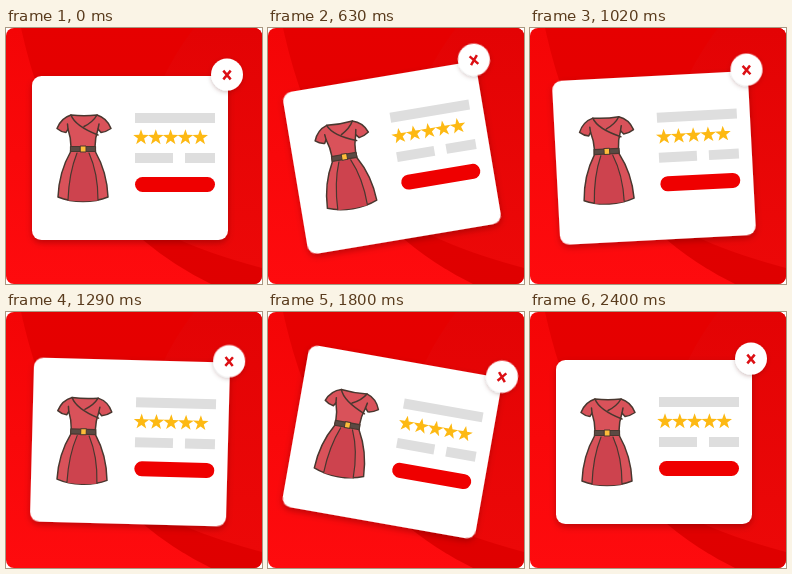
Recreate the animation shown at these times as an HTML page. Size 256x256 px, loop 2.43 s.

```html
<!DOCTYPE html>
<html lang="en">
<head>
<meta charset="utf-8">
<title>Swinging product card</title>
<style>
html, body { margin: 0; width: 100%; height: 100%; overflow: hidden; background: #fff; }
svg { display: block; width: 100vw; height: 100vh; }
</style>
</head>
<body>
<svg viewBox="0 0 256 256">
  <defs>
    <clipPath id="stage"><rect width="256" height="256" rx="8"/></clipPath>
    <linearGradient id="base" x1="0" y1="0" x2="0" y2="1">
      <stop offset="0" stop-color="#f40506"/>
      <stop offset="1" stop-color="#fe0b0e"/>
    </linearGradient>
    <linearGradient id="band" x1="0" y1="0" x2="0" y2="1">
      <stop offset="0" stop-color="#e60000"/>
      <stop offset="1" stop-color="#df0000"/>
    </linearGradient>
    <linearGradient id="disc" x1="0" y1="0" x2="0" y2="1">
      <stop offset="0" stop-color="#e30304"/>
      <stop offset="1" stop-color="#ec0808"/>
    </linearGradient>
    <filter id="soft" x="-30%" y="-30%" width="160%" height="160%">
      <feDropShadow dx="0" dy="3" stdDeviation="3" flood-color="#500" flood-opacity=".38"/>
    </filter>
    <filter id="lift" x="-30%" y="-30%" width="160%" height="160%">
      <feDropShadow dx="0" dy="1.500" stdDeviation="2" flood-color="#400" flood-opacity=".25"/>
    </filter>
  </defs>
  <g clip-path="url(#stage)">
    <rect width="256" height="256" fill="url(#base)"/>
    <path d="M15 0Q48 150 137 212Q168 238 205 256H256V0Z" fill="url(#band)"/>
    <path d="M188 0Q105 110 165 208Q200 225 256 240V0Z" fill="url(#disc)"/>
    <g id="card">
      <rect x="26" y="48" width="196" height="164" rx="9.500" fill="#fff" filter="url(#soft)"/>
      <g stroke="#49372f" stroke-width="1.500" stroke-linejoin="round" stroke-linecap="round" fill="none">
        <path fill="#d9525a" d="M65 87Q78 88.500 91 87Q101 90 105 100.500Q100 104 95 104.500L92 101Q89 110 89 119L89.500 124Q101 144 102 169Q91 173.500 77 173.500Q63 173.500 52 169Q53 144 64.500 124L65 119Q65 110 62 101L60 104.500Q55 104 51 100.500Q55 90 65 87Z"/>
        <path fill="#cd434e" stroke="none" d="M71 124.500Q63 145 62 172.500Q77 174 92 172.500Q92 145 83 124.500Z"/>
        <path d="M65 87Q69 98 92 107M91 87Q87 94 78 98.500M62 101L61.500 96M92 101L93 96"/>
        <path stroke-width="1.200" d="M71 125Q63 145 62 172M83 125Q92 145 92 172"/>
        <rect x="64.500" y="118.500" width="25" height="5" fill="#5a4a43" stroke-width="1.200"/>
        <rect x="74.500" y="118" width="5.500" height="6" fill="#fdbd3a" stroke-width="1"/>
      </g>
      <g fill="#dedede">
        <rect x="129" y="85" width="80" height="10"/>
        <rect x="129" y="125" width="38" height="10"/>
        <rect x="179" y="125" width="30" height="10"/>
      </g>
      <g id="stars" fill="#fdb913"></g>
      <rect x="129" y="149" width="80" height="15" rx="7.500" fill="#ef0000"/>
      <circle cx="221" cy="46.600" r="16" fill="#fff" filter="url(#lift)"/>
      <path d="M217.300 42.600L224.700 51.400M224.700 42.600L217.300 51.400" stroke="#dc0f14" stroke-width="2.500"/>
    </g>
  </g>
</svg>
<script>
const LOOP = 2430, SWING = 2400, STEP = 30, MAX = 10;
const card = document.getElementById('card');

function star(cx, cy, r) {
  const pts = Array.from({ length: 10 }, (_, i) => {
    const a = (i * 36 - 90) * Math.PI / 180, d = i % 2 ? r * 0.4 : r;
    return (cx + d * Math.cos(a)).toFixed(2) + ',' + (cy + d * Math.sin(a)).toFixed(2);
  });
  return `<polygon points="${pts.join(' ')}"/>`;
}
document.getElementById('stars').innerHTML =
  [0, 1, 2, 3, 4].map(i => star(135 + i * 14.8, 109.5, 8.2)).join('');

// Triangle wave: 0, -MAX, 0, +MAX, 0, then a short rest at 0.
function angle(ms) {
  const q = Math.min(ms, SWING) / SWING * 4;
  return MAX * (q < 1 ? -q : q < 3 ? q - 2 : 4 - q);
}

function draw(now) {
  const ms = Math.floor((now % LOOP) / STEP) * STEP;
  card.setAttribute('transform', `rotate(${angle(ms)} 124 130)`);
}

const start = performance.now();
function tick() {
  draw(performance.now() - start);
  requestAnimationFrame(tick);
}
tick();
</script>
</body>
</html>
```
